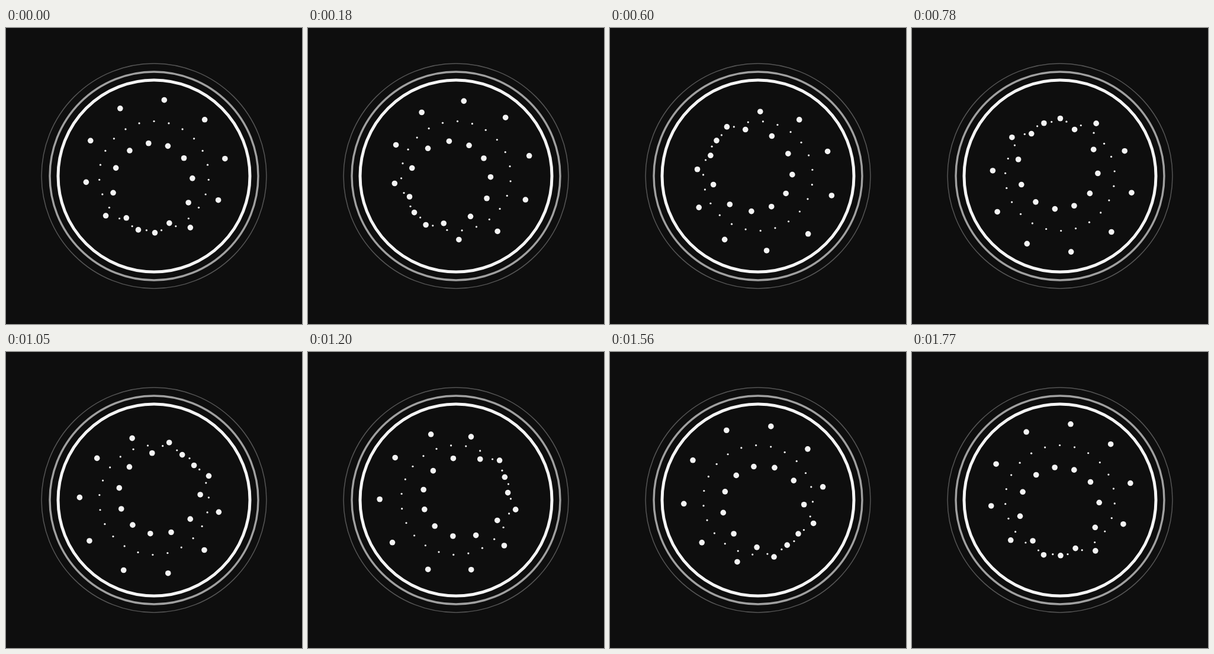
Write an HTML page with a canvas that moves like this. It is 500 by 500 pixels and loops after 1.8 s.

```html
<!DOCTYPE html>
<html>
<head>
<meta charset="utf-8">
<title>Orbiting dots</title>
<style>
html, body { margin: 0; width: 100%; height: 100%; overflow: hidden; background: #0e0e0e; }
canvas { display: block; }
</style>
</head>
<body>
<canvas id="stage" width="500" height="500"></canvas>
<script>
const ctx = document.getElementById('stage').getContext('2d');
const TAU = 2 * Math.PI, DEG = TAU / 360;
const LOOP = 1800, CENTER = 250, ORBIT = 92.5, SWING = 37;
const SMALL = 23, LARGE = 21;

function ring(radius, width, color) {
  ctx.beginPath();
  ctx.arc(CENTER, CENTER, radius, 0, TAU);
  ctx.lineWidth = width;
  ctx.strokeStyle = color;
  ctx.stroke();
}

// angle runs clockwise from the top
function dot(angle, orbit, size) {
  ctx.beginPath();
  ctx.arc(CENTER + orbit * Math.sin(angle), CENTER - orbit * Math.cos(angle), size, 0, TAU);
  ctx.fill();
}

function draw(now) {
  const p = now % LOOP / LOOP;
  ctx.fillStyle = '#0e0e0e';
  ctx.fillRect(0, 0, 500, 500);
  ring(190, 1.5, '#555');
  ring(176, 3.4, '#a0a0a0');
  ring(162, 5, '#f4f4f4');

  ctx.fillStyle = '#f4f4f4';
  for (let i = 0; i < SMALL; i++) dot((i + p) / SMALL * TAU, ORBIT, 1.6);

  // each large dot shifts back one slot per loop while its orbit swings in and out
  for (let i = 0; i < LARGE; i++) {
    const angle = (i - p) / LARGE * TAU + 7.7 * DEG;
    const phase = (10 * i + 11 * p) / LARGE * TAU + 0.8 * DEG;
    dot(angle, ORBIT + SWING * Math.cos(phase), 4.8);
  }
  requestAnimationFrame(draw);
}

draw(performance.now());
</script>
</body>
</html>
```
